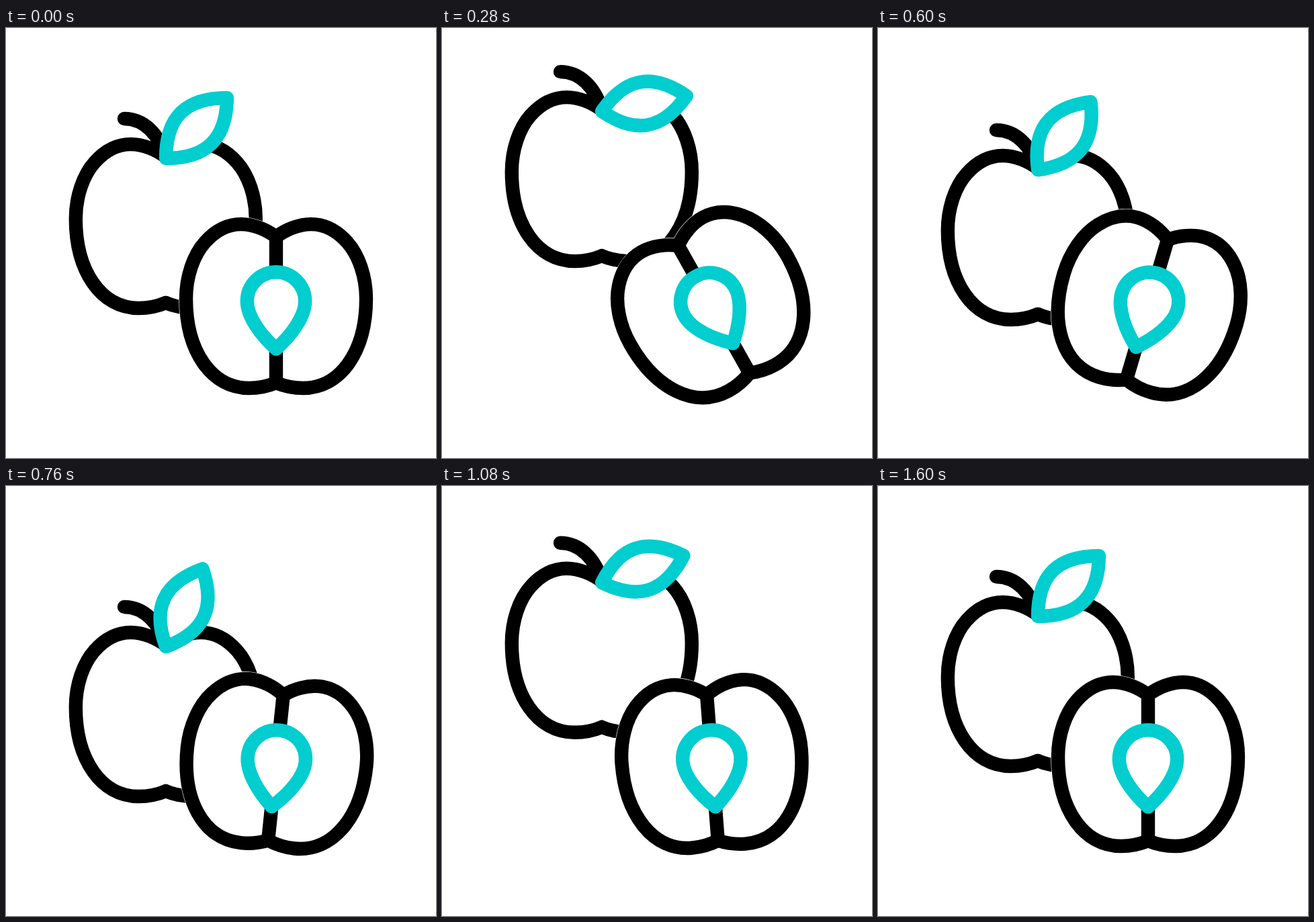
Write an HTML page that moves like this. It is 640x640 px and loops after 2000 ms.

```html
<!DOCTYPE html>
<html lang="en">
<head>
<meta charset="utf-8">
<title>Apples</title>
<style>
  html, body { margin: 0; height: 100%; overflow: hidden; background: #fff; }
  svg { display: block; width: 100vw; height: 100vh; }
  .ink { fill: none; stroke: #000; stroke-width: 20.4; stroke-linecap: round; stroke-linejoin: round; }
  .teal { fill: #fff; stroke: #02cdcf; }
  .flat { stroke-linecap: butt; }
  .halo { fill: #fff; stroke: #fff; stroke-width: 21.6; }
</style>
</head>
<body>
<svg viewBox="0 0 640 640">
  <defs>
    <path id="side" d="M0-103C-14-114-34-122-52-122C-72-122-91-112-106-95C-123-76-134-44-134-11C-134 66-97 122-40 122C-26 122-12 119 0 114"/>
    <g id="apple">
      <use href="#side"/>
      <use href="#side" transform="scale(-1 1)"/>
    </g>
  </defs>
  <g id="whole" class="ink">
    <use href="#apple" x="237.8" y="295"/>
    <path d="M176 135C205 135 228 158 238 193"/>
    <path id="leaf" class="teal" d="M238 194C238 136 264 104 329 104C328 168 296 194 238 194Z"/>
  </g>
  <g id="half" class="ink">
    <use href="#apple" x="402" y="414" class="halo"/>
    <use href="#apple" x="402" y="414"/>
    <path class="flat" d="M402 311V528"/>
    <path class="teal" d="M402 477.5C424 458 445.2 430 445.2 406.5A43.2 43.2 0 0 0 358.8 406.5C358.8 430 380 458 402 477.5Z"/>
  </g>
</svg>
<script>
  const LOOP = 2000, STEP = 40;

  // Keys are [time in ms, value]
  const lift = [[0, 0], [360, -80], [720, 51], [1000, -56], [1400, 0]];
  const leafTurn = [[0, 0], [350, 38.3], [720, -22.5], [1020, 26.8], [1080, 26.4], [1600, 0]];
  const halfTurn = [[0, 0], [280, -29.3], [606, 16.5], [960, -9.6], [1240, 3.6], [1600, 0]];

  function valueAt(keys, t) {
    const next = keys.findIndex(([time]) => time > t);
    if (next < 0) return keys[keys.length - 1][1];
    const [t0, v0] = keys[next - 1], [t1, v1] = keys[next];
    const u = (t - t0) / (t1 - t0);
    return v0 + (v1 - v0) * u * u * (3 - 2 * u);
  }

  const place = (id, transform) =>
    document.getElementById(id).setAttribute('transform', transform);

  const start = performance.now();
  function draw() {
    const elapsed = (performance.now() - start) % LOOP;
    const t = Math.floor(elapsed / STEP) * STEP;
    place('whole', `translate(0 ${valueAt(lift, t)})`);
    place('leaf', `rotate(${valueAt(leafTurn, t)} 238 194)`);
    place('half', `rotate(${valueAt(halfTurn, t)} 402 414)`);
    requestAnimationFrame(draw);
  }
  draw();
</script>
</body>
</html>
```
